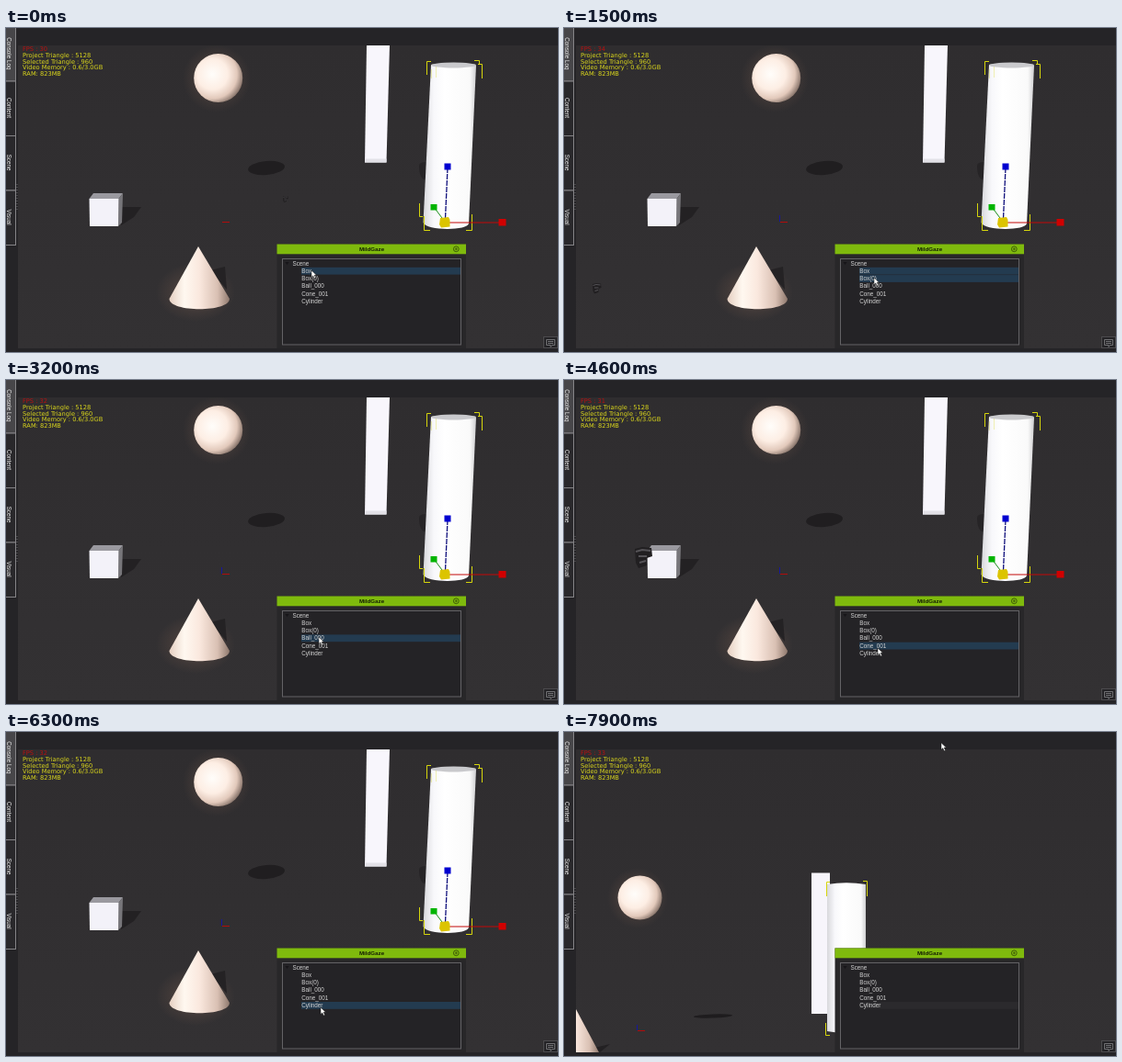
An HTML page for the animation above (8000 ms loop, 600x353 px).

```html
<!DOCTYPE html>
<html lang="en">
<head>
<meta charset="utf-8">
<title>Scene viewer</title>
<style>
  html, body { margin: 0; width: 100%; height: 100%; overflow: hidden; background: #252427; }
  svg { display: block; width: 100vw; height: 100vh; }
  text { font-family: "Liberation Sans", Arial, sans-serif; font-size: 6.3px; fill: #d2d2d2; white-space: pre; }
  #tabs text { fill: #f2f2f2; }
  .stats text { font-family: "DejaVu Sans", Verdana, sans-serif; font-size: 6.65px; fill: #dcd81c; }
  .stats .fps { fill: #b81010; }
  .brackets { fill: none; stroke: #d6d60c; stroke-width: 1; }
</style>
</head>
<body>
<svg viewBox="0 0 600 353" preserveAspectRatio="none">
  <defs>
    <radialGradient id="ball" cx=".38" cy=".42" r=".7">
      <stop offset="0" stop-color="#fffdfa"/><stop offset=".45" stop-color="#fdeee4"/>
      <stop offset=".72" stop-color="#e2c9bb"/><stop offset="1" stop-color="#5f4e46"/>
    </radialGradient>
    <radialGradient id="glow">
      <stop offset=".5" stop-color="#806050" stop-opacity=".25"/><stop offset="1" stop-color="#806050" stop-opacity="0"/>
    </radialGradient>
    <linearGradient id="cone">
      <stop offset="0" stop-color="#e6d0c2"/><stop offset=".25" stop-color="#fff8f0"/>
      <stop offset=".5" stop-color="#fae8de"/><stop offset=".8" stop-color="#d9c0b3"/><stop offset="1" stop-color="#8f796e"/>
    </linearGradient>
    <linearGradient id="tube">
      <stop offset="0" stop-color="#d8d8dc"/><stop offset=".2" stop-color="#f8f8fb"/>
      <stop offset=".4" stop-color="#fff"/><stop offset=".88" stop-color="#fafafa"/><stop offset="1" stop-color="#cfcfd1"/>
    </linearGradient>
    <linearGradient id="floor" x2="0" y2="1">
      <stop offset="0" stop-color="#2f2d2f"/><stop offset="1" stop-color="#333133"/>
    </linearGradient>
    <clipPath id="view"><path d="M13 19H600V349H13Z"/></clipPath>
  </defs>

  <rect width="600" height="353" fill="#252427"/>
  <rect x="13" y="19" width="587" height="330" fill="url(#floor)"/>
  <path d="M12 170V200" stroke="#6a696c" stroke-dasharray="1 2"/>

  <g id="mainView" clip-path="url(#view)">
    <circle cx="229" cy="55" r="37" fill="url(#glow)"/>
    <ellipse cx="206" cy="288" rx="43" ry="32" fill="url(#glow)"/>
    <ellipse cx="283" cy="152.500" rx="20" ry="7.500" fill="#201e20" transform="rotate(-5 283 152)"/>
    <path d="M126 195L147 195L139 206L125 215Z" fill="#232123"/>
    <path d="M222 264L238 260L240 285Z" fill="#242224"/>
    <path d="M449 150Q449 146 457 146V166Q449 165 449 150Z" fill="#262426"/>

    <circle cx="230.700" cy="54.500" r="26.500" fill="url(#ball)"/>
    <path d="M90.500 186L95 180H127L122.500 186Z" fill="#9a999f"/>
    <path d="M122.500 186L127 180L126 212L122 216Z" fill="#77767a"/>
    <path d="M90.500 186H122.500L122 216H91Z" fill="#f3f2f9"/>
    <path d="M392 19H417L413.500 146.500H390Z" fill="#f8f6fc"/>
    <path d="M390 146.500L391 142.500H413.500V146.500Z" fill="#e2e1e7"/>
    <path d="M209 238L243 295C243 310 177.500 310 177.500 295Z" fill="url(#cone)"/>
    <path d="M462 40L453.500 212C456 221 502 221 503 213L511 41Z" fill="url(#tube)"/>
    <ellipse cx="486.500" cy="40.500" rx="24.500" ry="3" fill="#c9c9cc"/>

    <path class="brackets" d="M457.500 51V36.500H462M513 39.500H517.500V55M509 35.500H514.500V39M449.500 191V205.500H453M454.500 205V220.500H461M500 220.500H506.500V203"/>
    <path class="brackets" d="M462.500 45V55M467.500 42V54" opacity=".3"/>
    <path d="M480 152L477.500 208" stroke="#10107c" stroke-width="1.300" stroke-dasharray="6 1"/>
    <path d="M465 195L477 211" stroke="#178a17" stroke-width="1"/>
    <path d="M482 212H537" stroke="#c40808" stroke-width="1.200"/>
    <rect x="476.500" y="147.500" width="7" height="7" fill="#0000d0"/>
    <rect x="461.500" y="192" width="7" height="6.500" fill="#00b400"/>
    <rect x="535.500" y="208" width="8" height="7.500" fill="#d00000"/>
    <path d="M472 207L481 206L482.500 209V216.500L473 217.500L471 214Z" fill="#dcc400"/>

    <path d="M235 211.500H243" stroke="#b00c0c"/>
    <path id="blueAxis" d="M234.500 204V211" stroke="#1616a0"/>
    <g id="camera">
      <path d="M-10 -8L-2 -10L8 -9L9 0L3 2V10L-6 13L-9 7Z" fill="#211f21"/>
      <path d="M-9 -5L-2 -7L7 -6M-6 0H3M-5 7L2 5" fill="none" stroke="#555357" stroke-width="2"/>
    </g>
  </g>

  <g id="cameraView" clip-path="url(#view)">
    <circle cx="80" cy="181" r="33" fill="url(#glow)"/>
    <ellipse cx="162" cy="309.500" rx="21" ry="2" fill="#1e1c1e" transform="rotate(-2 162 309)"/>
    <path d="M33 344L50 340L39 349Z" fill="#232123"/>
    <circle cx="82.500" cy="180.500" r="24" fill="url(#ball)"/>
    <path d="M-13 349L13 302L38 349Z" fill="url(#cone)"/>
    <path d="M269 153.500H289V307H269Z" fill="#f7f5fb"/>
    <path d="M286 166Q307 162.500 328 166V326Q307 330 286 326Z" fill="url(#tube)"/>
    <path class="brackets" d="M325 162.500H329.500V179M289 163.500H285.500V179M284.500 317V330.500H289"/>
    <path d="M80 325.500H88" stroke="#b00c0c"/>
    <path d="M79.500 319V325" stroke="#1616a0"/>
  </g>

  <g class="stats">
    <text id="fps" class="fps" x="18" y="25"></text>
    <text x="18" y="32">Project Triangle : 5128</text>
    <text x="18" y="38.500">Selected Triangle : 960</text>
    <text x="18" y="45">Video Memory : 0.6/3.0GB</text>
    <text x="18" y="51.500">RAM: 823MB</text>
  </g>

  <g id="tabs"></g>

  <rect x="294.500" y="235.500" width="205.500" height="113.500" fill="#282729"/>
  <rect x="294.500" y="235.500" width="205.500" height="10.800" fill="#7fba0d"/>
  <text x="397.500" y="243.300" text-anchor="middle" style="font-weight:bold;font-size:6.2px;fill:#141c04">MildGaze</text>
  <circle cx="489.300" cy="240.800" r="2.900" fill="none" stroke="#304708" stroke-width=".8"/>
  <path d="M487.800 240.800H490.800M489.300 239.300V242.300" stroke="#304708" stroke-width=".7"/>
  <rect x="300.500" y="251.500" width="194" height="93.500" fill="#242326" stroke="#646366"/>
  <path d="M303.500 255H307.500L305.500 258Z" fill="#161518"/>
  <text x="311.500" y="258.500">Scene</text>
  <g id="list"></g>

  <rect x="584.500" y="336.500" width="15" height="12" fill="#242326" stroke="#4c4b4e"/>
  <path d="M587.500 339.500H596.500V345.500H593.500L592 347.500V345.500H587.500ZM589 341.500H595M589 343.500H595" fill="none" stroke="#858487" stroke-width=".8"/>

  <g id="menu">
    <rect x="389.500" y="-4" width="38" height="17" fill="#1c1b1e" stroke="#77767a"/>
    <text x="391.500" y="4.700">Switch</text>
    <text x="391.500" y="12">Camera</text>
  </g>
  <path id="cursor" d="M0 0V7.500L1.800 5.900L3.200 9L4.600 8.300L3.200 5.300H5.500Z" fill="#fff" stroke="#111" stroke-width=".5"/>
</svg>
<script>
const LOOP = 8000, VIEW_CUT = 7400;
const byId = id => document.getElementById(id);
const show = (node, visible) => node.setAttribute("display", visible ? "inline" : "none");
const add = (parent, tag, attrs, text = "") => {
  const node = document.createElementNS("http://www.w3.org/2000/svg", tag);
  for (const key in attrs) node.setAttribute(key, attrs[key]);
  node.textContent = text;
  return parent.appendChild(node);
};

["Console Log", "Content", "Scene", "Visual"].forEach((label, i) => {
  const top = i ? 58 + (i - 1) * 59.5 : -1;
  const height = i ? 59.5 : 59;
  add(byId("tabs"), "rect", { x: -1, y: top, width: 11.5, height, fill: i ? "#29282b" : "#474649", stroke: "#858487" });
  add(byId("tabs"), "text", { transform: `translate(1.3 ${top + height / 2 - 0.7}) rotate(90)`, "text-anchor": "middle" }, label);
});

const rows = ["Box", "Box(0)", "Ball_000", "Cone_001", "Cylinder"].map((label, i) => {
  const y = 260.8 + i * 8.3;
  const bar = add(byId("list"), "rect", { x: 321, y, width: 173, height: 7.8 });
  add(byId("list"), "text", { x: 321.3, y: y + 6 }, label);
  return bar;
});

// Each key is [time, ...values], eased between neighbours.
function track(keys, t) {
  const next = keys.findIndex(key => key[0] > t);
  if (next < 0) return keys[keys.length - 1].slice(1);
  const a = keys[next - 1], b = keys[next];
  const u = (t - a[0]) / (b[0] - a[0]);
  const k = u * u * (3 - 2 * u);
  return a.slice(1).map((v, i) => v + (b[i + 1] - v) * k);
}

const cursorKeys = [
  [0, 332, 264], [800, 332, 264], [1400, 337, 272], [2300, 337, 272],
  [2800, 340, 280], [3700, 340, 280], [4200, 341, 292], [4900, 341, 292],
  [5300, 342, 300], [6400, 342, 300], [6900, 414, 0], [7100, 414.5, -5.5],
  [7350, 410.5, 10], [7700, 410, 11.7]
];
// x, y and scale of the flying camera
const cameraKeys = [
  [0, 304, 186, .3], [300, 304, 186, .3], [1300, 36, 283, .5], [1800, 36, 283, .5],
  [2700, 370, 290, .7], [3500, 330, 320, .9], [4400, 87, 192, 1], [4700, 87, 192, 1],
  [5400, 340, 285, .6]
];
const hoverTimes = [0, 1100, 2550, 3950, 5100];

function draw(t) {
  const [mx, my] = track(cursorKeys, t);
  byId("cursor").setAttribute("transform", `translate(${mx} ${my})`);
  const [cx, cy, size] = track(cameraKeys, t);
  byId("camera").setAttribute("transform", `translate(${cx} ${cy}) scale(${size})`);

  const active = hoverTimes.filter(start => start <= t).length - 1;
  rows.forEach((bar, i) => {
    const selected = i === active || (i === 0 && t >= 1100 && t < 1900);
    show(bar, selected);
    bar.setAttribute("fill", t > 6500 ? "#2b2a2d" : "#233b50");
  });

  show(byId("mainView"), t < VIEW_CUT);
  show(byId("cameraView"), t >= VIEW_CUT);
  show(byId("menu"), t >= 6850 && t < VIEW_CUT);
  show(byId("blueAxis"), t >= 400);
  byId("fps").textContent = `FPS : ${30 + Math.floor(t / 200) * 7 % 5}`;
}

function frame(now) {
  draw(now % LOOP);
  requestAnimationFrame(frame);
}
draw(0);
requestAnimationFrame(frame);
</script>
</body>
</html>
```
